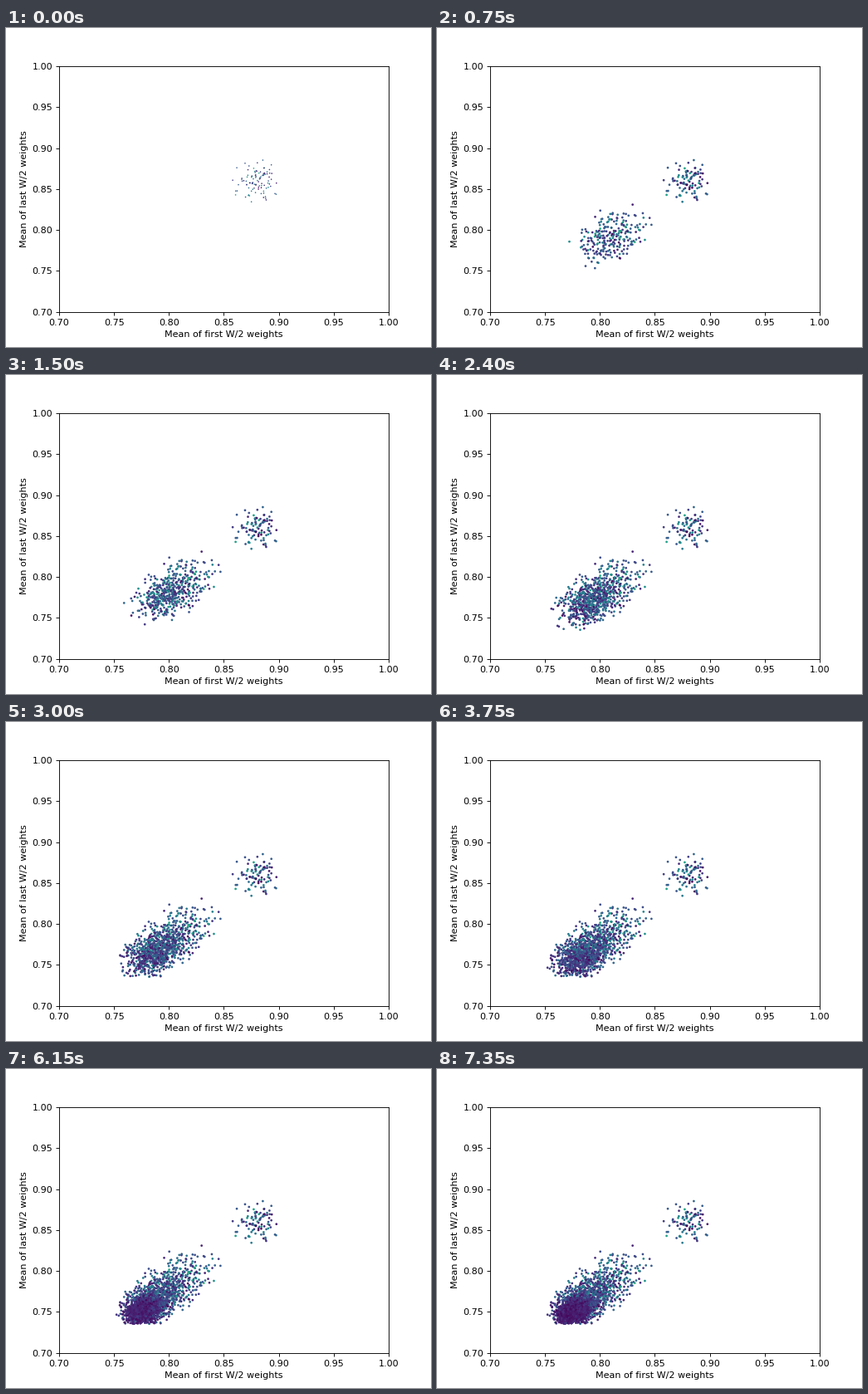
Animation, 512 px wide and 384 px high, one loop 7500 ms. Source, as a matplotlib script:

```python
import numpy as np
import matplotlib.pyplot as plt
from matplotlib.animation import FuncAnimation

FRAMES, STEP = 50, 150
FIRST, PER_GEN = 100, 50
LOW = np.array([0.7515, 0.7355])


def cloud(rng, n, limit, tilt):
    """Normal pairs inside a circle, sheared so y leans along x."""
    z = rng.normal(size=(n * 4, 2))
    x, y = z[np.hypot(*z.T) < limit][:n].T
    return np.column_stack([x, tilt * x + np.sqrt(1 - tilt**2) * y])


def generation(rng, g):
    """Positions and fitness of the individuals born in generation g."""
    if g == 0:
        pts = [0.8795, 0.859] + cloud(rng, FIRST, 2.2, 0) * [0.0112, 0.0127]
        return pts, rng.beta(1.5, 2.2, FIRST) * 0.65
    k = g - 1
    mean = [0.774, 0.749] + np.array([0.042, 0.050]) * np.exp(-k / 10)
    spread = 0.005 + 0.0085 * np.exp(-(k / 30) ** 2)
    pts = mean + spread * cloud(rng, PER_GEN, 2.75, 0.2)
    pts = np.where(pts < LOW, 2 * LOW - pts, pts)
    scale = 0.1 + 0.57 * np.exp(-(k / 28) ** 2)
    return pts, 0.02 + scale * rng.beta(1.5, 2.2, PER_GEN)


rng = np.random.default_rng(12)
places, fits = zip(*(generation(rng, g) for g in range(FRAMES)))
points = np.vstack(places)
colors = plt.cm.viridis(np.concatenate(fits))

fig, ax = plt.subplots(figsize=(6.4, 4.8), dpi=80)
ax.set(xlim=(0.7, 1), ylim=(0.7, 1),
       xlabel="Mean of first W/2 weights", ylabel="Mean of last W/2 weights")
dots = ax.scatter([], [], linewidths=0)


def update(i):
    n = FIRST + PER_GEN * i
    dots.set_offsets(points[:n])
    dots.set_facecolors(colors[:n])
    dots.set_sizes([2 if i == 0 else 6])
    return dots,


anim = FuncAnimation(fig, update, frames=FRAMES, interval=STEP,
                     repeat=True, repeat_delay=0)
plt.show()
```
